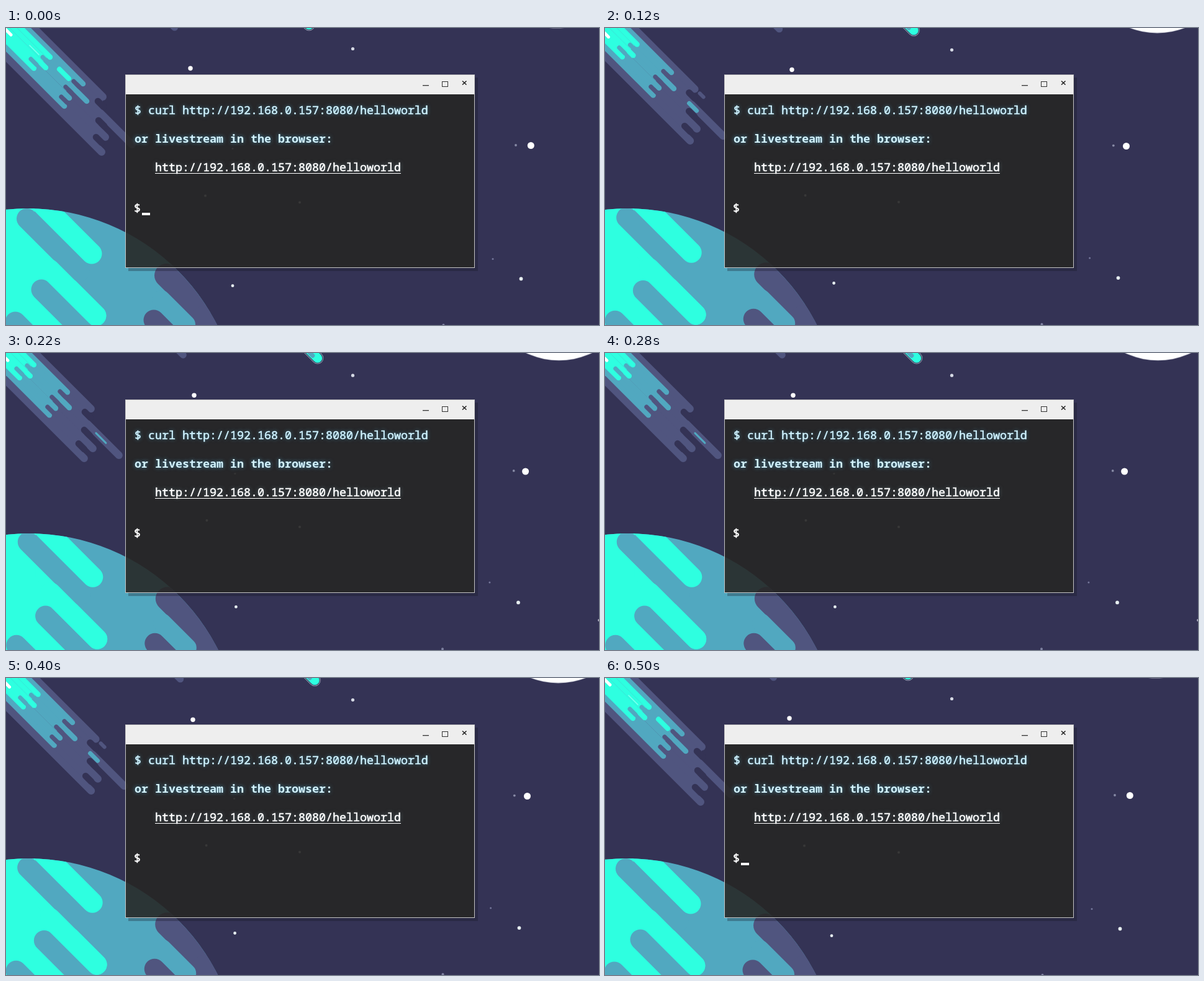
These frames come from a looping animation (955 px wide and 479 px high, 0.56 s). An HTML page with a canvas:

```html
<!DOCTYPE html>
<html lang="en">
<head>
<meta charset="utf-8">
<style>
  html, body { margin: 0; width: 100%; height: 100%; overflow: hidden; background: #343355; }
  canvas { display: block; }
</style>
</head>
<body>
<canvas id="stage" width="955" height="479"></canvas>
<script>
const ctx = document.getElementById('stage').getContext('2d');
const SKY = '#343355', PURPLE = '#50557f', TEAL = '#51a8c0', CYAN = '#2effe0';
const LOOP = 560, TAU = Math.PI * 2;

function line(x0, y0, x1, y1, width, color, cap = 'round') {
  ctx.beginPath();
  ctx.moveTo(x0, y0);
  ctx.lineTo(x1, y1);
  ctx.lineWidth = width;
  ctx.lineCap = cap;
  ctx.strokeStyle = color;
  ctx.stroke();
}

function disc(x, y, r, color) {
  ctx.beginPath();
  ctx.arc(x, y, r, 0, TAU);
  ctx.fillStyle = color;
  ctx.fill();
}

function box(x, y, w, h, color) {
  ctx.fillStyle = color;
  ctx.fillRect(x, y, w, h);
}

// Diagonal bar on the lane x - y = d
const bar = (d, x0, x1, width, color, cap) => line(x0, x0 - d, x1, x1 - d, width, color, cap);

// Diagonal bar running down-right from its rounded start
const streak = (x, y, length, width, color) => line(x, y, x + length, y + length, width, color);

// x, y, x speed, y speed, radius, colour
const stars = [
  [297, 65, 2, 1.1, 3.7, '#fff'], [558.5, 33.5, 0, .9, 2.6, '#d5d9e4'],
  [845.3, 189.5, -2.9, .5, 5.5, '#fff'], [821, 189, -1.1, .3, 1.9, '#878aa5'],
  [829.5, 404.5, -1.5, -.7, 2.9, '#e6eef0'], [784, 372.5, -1.7, -.8, 1.5, '#74779a'],
  [365, 415.7, 1.8, -2.1, 2.4, '#e6eef0'], [321, 270.5, .8, -.2, 2, '#bbc'],
  [473, 281.2, 0, -.2, 2, '#bbc'], [365, 194.5, 1.3, 0, 1.6, '#99a'],
  [704.5, 479, -.5, -.6, 2, '#7e81a0'], [964, 433, -3, -.7, 2, '#aab'],
];

// Comet layers: teeth and the notches between them, as lane, reach, retreat
const layers = [
  { color: PURPLE, back: SKY, width: 12, pace: [0, .28, .6, 1],
    teeth: [[45, 156, 20], [15, 203, 22], [-16, 160, 21], [-46, 154, 29]],
    notches: [[30, 148, 22], [0, 149, 24], [-31, 145, 29]] },
  { color: TEAL, back: PURPLE, width: 8.6, pace: [0, .3, .68, 1],
    teeth: [[34, 124, 26], [12, 130, 29], [-11, 102, 23], [-32, 94, 25]],
    notches: [[23, 109, 23], [1, 96, 23], [-22, 89, 23]] },
  { color: CYAN, back: TEAL, width: 8.4, pace: [0, .43, .74, 1],
    teeth: [[24, 71, 27], [0, 64, 26], [-20, 45, 24]],
    notches: [[12, 59, 26], [-10, 40, 24]] },
];

// Loose fragments per pose: lane, from, to, width, colour
const fragments = [
  [[19.5, 86, 101, 8, CYAN], [10, 38, 53, 1.3, '#8bfff0'], [-3, -9, 8, 5, '#fff']],
  [[12.5, 130, 138, 8, TEAL], [21, 84, 101, 4, CYAN], [-9, -9, 5, 5, '#fff']],
  [[13, 135, 147, 7, TEAL], [46, 152, 158, 6, PURPLE], [-10, -9, 5, 5, '#fff']],
  [[14, 144, 160, 3, TEAL], [-11, -9, 2, 5, '#fff']],
];

function drawComet(pose) {
  ctx.save();
  ctx.translate(pose * .3, -pose * .3);
  for (const { color, back, width, pace, teeth, notches } of layers) {
    const reach = ([, x, retreat]) => x - retreat * pace[pose];
    for (const n of notches) bar(n[0], -80, reach(n) + 4, width, color, 'butt');
    for (const t of teeth) bar(t[0], -80, reach(t), width, color);
    for (const n of notches) bar(n[0], reach(n), reach(n) + 9, width - 1.5, back);
  }
  for (const f of fragments[pose]) bar(...f);
  ctx.restore();
}

function drawPlanet(pose) {
  ctx.save();
  ctx.translate(pose * .6, 0);
  disc(35, 632.4, 341.4, TEAL);
  ctx.clip();
  ctx.translate(0, -pose * .9);
  // Cyan side with teal inlets
  bar(-226, -100, 138, 33, CYAN);
  bar(-319, -100, 145, 33, CYAN);
  ctx.beginPath();
  ctx.moveTo(-10, 280);
  ctx.lineTo(46, 280);
  ctx.lineTo(46, 364);
  ctx.lineTo(100, 442);
  ctx.lineTo(100, 490);
  ctx.lineTo(-10, 490);
  ctx.fillStyle = CYAN;
  ctx.fill();
  streak(33.5, 307.5, 85, 33, TEAL);
  streak(57 + pose * 1.6, 422 + pose * 1.6, 120, 33, TEAL);
  streak(15, 474, 60, 33, TEAL);
  bar(-319, 70, 145, 32.5, CYAN);
  // Shaded side
  streak(258, 399, 200, 38, PURPLE);
  streak(322, 478, 60, 60, PURPLE);
  streak(290, 478, -40, 30, TEAL);
  streak(238, 471, 60, 33, PURPLE);
  ctx.restore();
}

function drawSky(pose) {
  box(0, 0, 955, 479, SKY);
  for (const [x, y, vx, vy, r, color] of stars) disc(x + vx * pose, y + vy * pose, r, color);
  const moonY = .6 + 3.9 * pose - 124;
  disc(887 + 1.2 * pose, moonY, 124, '#a9abbb');
  disc(887 + 1.2 * pose, moonY, 123.2, '#fff');

  const stubX = 271.5 + 4.6 * pose, stubY = -1 + 1.4 * pose;
  streak(stubX, stubY, -40, 11, PURPLE);
  const tipX = 488 + 4.6 * pose, tipY = -5 + 4.4 * pose;
  streak(tipX, tipY, -40, 19, '#8c9bb0');
  streak(tipX, tipY, -40, 17, SKY);
  streak(tipX, tipY, -40, 15, CYAN);
  streak(tipX - 8, tipY - 4, -30, 7, TEAL);

  drawComet(pose);
  drawPlanet(pose);
}

function text(string, x, y, color, glow, weight = 400) {
  ctx.font = `${weight} 18.33px "Noto Sans Mono", monospace`;
  ctx.fillStyle = ctx.strokeStyle = color;
  ctx.shadowColor = glow;
  ctx.shadowBlur = 6;
  ctx.fillText(string, x, y);
  ctx.shadowColor = 'transparent';
  // A hairline outline gives the regular weight more body
  ctx.lineWidth = .55;
  if (weight === 400) ctx.strokeText(string, x, y);
}

function drawTerminal(cursor) {
  // The shadow stays outside the translucent panel
  const shadow = 'rgba(20,20,35,.3)';
  box(755, 80, 5, 312, shadow);
  box(197, 387, 558, 5, shadow);
  box(193, 107, 561, 279, 'rgba(38,38,36,.88)');
  box(193, 76, 561, 31, '#eee');
  ctx.lineWidth = 1;
  ctx.strokeStyle = '#c4c4c4';
  ctx.strokeRect(192.5, 75.5, 562, 311);

  line(671, 92.7, 681, 92.7, 1.2, '#222', 'butt');
  ctx.lineWidth = 1;
  ctx.strokeStyle = '#333';
  ctx.strokeRect(702.5, 86.5, 9, 8);
  line(735, 85.5, 741.5, 91.5, 1.6, '#222', 'butt');
  line(741.5, 85.5, 735, 91.5, 1.6, '#222', 'butt');

  const url = 'http://192.168.0.157:8080/helloworld';
  const glow = 'rgba(80,165,200,.75)';
  text('$ curl ' + url, 207, 139, '#cff2ff', glow);
  text('or livestream in the browser:', 207, 185, '#d3f2fd', glow, 700);
  text(url, 240, 231, '#fff', 'rgba(120,150,160,.7)');
  box(240, 234, 396, 1, '#fff');
  text('$', 206, 297, '#fff', 'transparent');
  if (cursor) box(219, 298, 13, 4, '#fff');
}

function render(now) {
  const t = now % LOOP;
  // The second half plays the first half backwards
  const m = t < LOOP / 2 ? t : LOOP - .01 - t;
  const pose = [60, 120, 220].filter(change => m >= change).length;
  drawSky(pose);
  drawTerminal(pose < 2);
}

const start = performance.now();
function tick() {
  render(performance.now() - start);
  requestAnimationFrame(tick);
}
tick();
</script>
</body>
</html>
```
